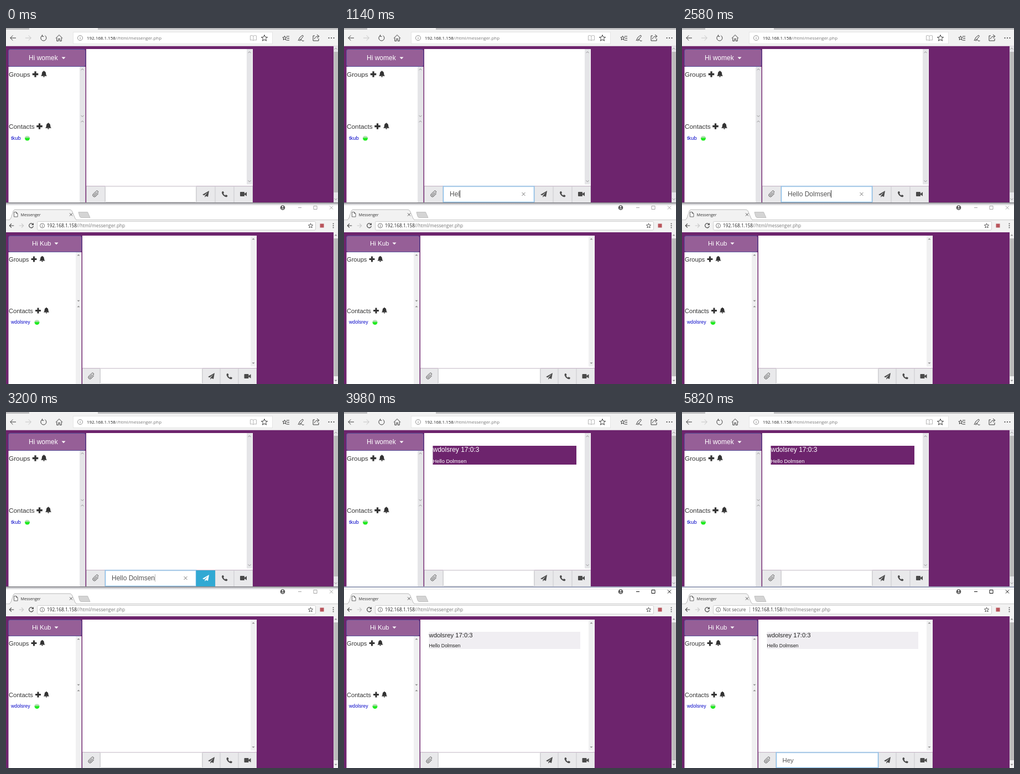
An HTML page that plays this animation: 600x643 px, repeating every 6020 ms.

```html
<!DOCTYPE html>
<html lang="en">
<head>
<meta charset="utf-8">
<title>Messenger</title>
<style>
  html, body { margin: 0; width: 100%; height: 100%; overflow: hidden; background: #fff; }
  svg { display: block; width: 600px; height: 643px; }
  text { white-space: pre; font-family: Arial, "Liberation Sans", sans-serif; }
  .ui { font-family: "Open Sans", "Noto Sans", sans-serif; }
  .line { fill: none; stroke: #3a3a3a; }
</style>
</head>
<body>
<svg id="stage" viewBox="0 0 600 643" xmlns="http://www.w3.org/2000/svg"></svg>
<script>
const LOOP = 6020, PURPLE = '#6d246d';

// Icons live in a 12 x 12 box.
const ICONS = {
  plus: 'M4.3.5h3.4v3.8h3.8v3.4H7.7v3.8H4.3V7.7H.5V4.3h3.8z',
  bell: 'M6 0a1 1 0 0 1 1 1Q9.6 1.8 9.6 5 9.6 8 11.5 9.5H.5Q2.4 8 2.4 5 2.4 1.8 5 1A1 1 0 0 1 6 0zM4.5 10h3a1.5 1.5 0 0 1-3 0z',
  plane: 'M12 0 0 7l3 1.3L10 2.4 4.4 8.9V12l1.9-2.4L10 11z',
  phone: 'M1.2 1.2 3.3.2 5 3.6 3.6 5Q5 7.6 7.2 8.6L8.6 7.2 12 9l-1 2.1Q9.5 12.5 6 10.6 2 8 .8 4.5.2 2.5 1.2 1.2z',
  video: 'M1 2h6q1 0 1 1v2.3l4-3.1v7.6L8 6.7V9q0 1-1 1H1Q0 10 0 9V3Q0 2 1 2z',
  clip: 'M10.5 5.2 6 9.7A2.7 2.7 0 0 1 2 5.9L6.9 1a1.9 1.9 0 0 1 2.7 2.7L4.9 8.3a.9.9 0 0 1-1.3-1.3L7.7 2.9',
  star: 'M6 .5 7.6 4.3 11.5 4.6 8.5 7.2 9.5 11.2 6 9 2.5 11.2 3.5 7.2.5 4.6 4.4 4.3z',
  reload: 'M8.5 1.8A5 5 0 1 1 3.8 1.5M3.5.2V3.2H6.5',
  again: 'M9.9 2.6A5 5 0 1 0 11 6.8M10.8.3V3.9H7.2',
  back: 'M12 6H.8M5.8 1 .8 6l5 5',
  cross: 'M0 0 12 12M12 0 0 12'
};

const rect = (x, y, w, h, fill, extra = '') =>
  `<rect x="${x}" y="${y}" width="${w}" height="${h}" fill="${fill}" ${extra}/>`;
const text = (x, y, size, str, fill = '#333', extra = '') =>
  `<text x="${x}" y="${y}" font-size="${size}" fill="${fill}" ${extra}>${str}</text>`;
const path = (d, extra = 'class="line"') => `<path d="${d}" ${extra}/>`;
const group = (id, content, extra = '') => `<g id="${id}" ${extra}>${content}</g>`;
const place = (cx, cy, size) => `transform="translate(${cx - size / 2} ${cy - size / 2}) scale(${size / 12})"`;
const icon = (name, cx, cy, size, fill = '#333') =>
  path(ICONS[name], `${place(cx, cy, size)} fill="${fill}"`);
const outline = (name, cx, cy, size, stroke = '#3a3a3a', width = 1) =>
  path(ICONS[name], `${place(cx, cy, size)} fill="none" stroke="${stroke}" stroke-width="${width * 12 / size}"`);
const mirrored = (cx, content) => `<g transform="translate(${2 * cx} 0) scale(-1 1)">${content}</g>`;

// dir: -1 points up, 1 points down
function arrow(x, y, dir, solid) {
  const d = `M${x - 2.5} ${y - dir * 1.2}L${x} ${y + dir * 1.3}L${x + 2.5} ${y - dir * 1.2}`;
  return path(d, solid ? 'fill="#8c8c8c"' : 'fill="none" stroke="#8a8a8a" stroke-width=".9"');
}

function scrollbar(x, y, w, h, ends, solid) {
  return rect(x, y, w, h, solid ? '#f0f0f1' : '#e5e5e8') +
    ends.map(([at, dir]) => arrow(x + w / 2, at, dir, solid)).join('');
}

function heading(o, label, y, plusX, bellX) {
  return text(5, y, o.headSize, label) + icon('plus', plusX, y - 4.5, o.size - .5) +
    icon('bell', bellX, y - 4.7, o.size);
}

function message(o) {
  const { x, y, w, h, fill, ink } = o.msg;
  return group(o.id + 'Msg', rect(x, y, w, h, fill) +
    text(x, y + (o.solid ? 9.5 : 11.3), o.size, 'wdolsrey 17:0:3', ink) +
    text(x, y + h - 3.5, o.small, 'Hello Dolmsen', ink));
}

function inputRow(o) {
  const [a, b, c, d, e, f] = o.cells, h = o.end - o.row, cy = o.row + 14.5;
  const cell = (x, w) => rect(x + .5, o.row + .5, w - 1, h, '#e9e9eb', 'stroke="#d9d9dc"');
  const field = (stroke, extra) => rect(b + .5, o.row + .5, c - b - 1, h - 1, 'none', `stroke="${stroke}" ${extra}`);
  return cell(a, b - a) + cell(c, d - c) + cell(d, e - d) + cell(e, f - e) +
    rect(b, o.row, c - b, h, '#fff') + field('#d2d2d4', 'rx="1"') +
    group(o.id + 'Glow', field('#66afe9', 'stroke-width="3" opacity=".16"') + field('#85bfec', 'stroke-width="1"')) +
    outline('clip', (a + b) / 2, cy, 13, '#505050', 1) +
    icon('plane', (c + d) / 2, cy, 12, '#4a4a4a') + icon('phone', (d + e) / 2, cy, 11, '#4a4a4a') +
    icon('video', (e + f) / 2, cy, 12, '#4a4a4a') +
    text(o.textX, o.row + 18.2, o.size, '', '#555', `id="${o.id}Text"`) +
    rect(0, o.row + 7.5, 1, 13.5, '#333', `id="${o.id}Caret"`);
}

function page(o) {
  const { side, top, list, mid, end, cells, row, solid } = o;
  const left = cells[0], right = cells[5], bar = o.barX, barW = side - bar - 1;
  return rect(0, o.pageY, 600, end - o.pageY, PURPLE) +
    rect(4.5, top + .5, side - 5, list - top - 1, '#965f97', 'rx="3" stroke="#56529a"') +
    text(o.hiX, o.hiY, o.hiSize, o.hi, '#fff') +
    path(`M${o.dropX} ${o.hiY - 5.5}h7l-3.5 3.7z`, 'fill="#fff"') +
    rect(4.5, list, side - 5, end - list, '#fff') +
    scrollbar(bar, list, barW, mid - list, [[list + 5, -1], [mid - 5, 1]], solid) +
    scrollbar(bar, mid, barW, end - mid, [[mid + 5, -1]], solid) +
    heading(o, 'Groups', o.groupY, ...o.groupIcons) +
    heading(o, 'Contacts', o.contactY, ...o.contactIcons) +
    text(9, o.nameY, o.small, o.contact, '#0505c8') +
    `<circle cx="${o.dotX}" cy="${o.nameY - 2.5}" r="4.5" fill="url(#dot)"/>` +
    rect(left, top, right - left, row - top, '#fff') +
    scrollbar(right - 11, top, 10, row - top - 3, [[top + 6, -1], [row - 9, 1]], solid) +
    message(o) + inputRow(o) +
    scrollbar(592, o.pageY, 8, end - o.pageY, [[o.pageY + 5, -1], [end - 6, 1]], solid) +
    rect(592.5, o.thumb[0], 7.5, o.thumb[1], '#bbb');
}

const upper = {
  id: 'up', pageY: 32.5, top: 38, list: 70, mid: 164, row: 285.5, end: 315, side: 144, barX: 133,
  size: 12, headSize: 11.8, small: 9.4, hi: 'Hi womek', hiX: 41, hiY: 58, hiSize: 12, dropX: 100.5,
  groupY: 88, groupIcons: [53, 68.5], contactY: 182, contactIcons: [60.5, 76.5],
  contact: 'tkub', nameY: 201.5, dotX: 38.5, cells: [145, 179, 344, 378, 412, 446], textX: 191,
  thumb: [43, 254], msg: { x: 160.5, y: 61, w: 259.5, h: 34, fill: PURPLE, ink: '#fff' }
};
const lower = {
  id: 'low', pageY: 369, top: 375, list: 405, mid: 498, row: 614.5, end: 643, side: 137, barX: 126,
  size: 11.3, headSize: 11.1, small: 8.75, hi: 'Hi Kub', hiX: 47, hiY: 393, hiSize: 11.5, dropX: 87.5,
  groupY: 422, groupIcons: [50.5, 65.5], contactY: 515, contactIcons: [58, 73],
  contact: 'wdolsrey', nameY: 534, dotX: 56, cells: [138, 170, 355, 387, 420, 453], textX: 181.5,
  thumb: [380, 249], solid: true, msg: { x: 153.5, y: 397, w: 273.5, h: 31, fill: '#f0eef2', ink: '#222' }
};

const info = (x, y, r, color) =>
  `<circle cx="${x}" cy="${y}" r="${r}" class="line" style="stroke:${color};stroke-width:.8"/>` +
  path(`M${x} ${y - 2.2}v1M${x} ${y - .4}v2.7`, `stroke="${color}" stroke-width=".9"`);

const address = (x, y, size) => text(x, y, size,
  '192.168.1.158<tspan fill="#777">//html/messenger.php</tspan>', '#222', 'class="ui"');

function upperBar() {
  return rect(0, 0, 600, 32.5, '#f2f2f2') + rect(0, 0, 42, 3, '#bcbcbe') + rect(166, 0, 434, 3, '#bcbcbe') +
    rect(121.5, 7.5, 360, 21, '#fff', 'stroke="#e6e6e6"') +
    outline('back', 12.5, 18, 11) + mirrored(40.5, outline('back', 40.5, 18, 11, '#c4c4c4')) +
    outline('reload', 68, 18, 12) +
    path('M90 18.5 96 12.5l6 6M91.8 17.5V23.500h3v-4h2.400v4h3v-6') +
    info(134, 18, 4.5, '#777') + address(146, 21, 7.95) +
    path('M447 14.5v8M447 14.5q-3-2-5.500-.5v8q3-1 5.500.5 2.500-1.500 5.500-.5v-8q-3-1.500-5.500.5',
      'fill="none" stroke="#b5b5b5"') +
    outline('star', 467, 18, 12) +
    outline('star', 503.5, 18, 8) + path('M507 15h5M508 18.5h4M506.5 22h5.500') +
    path('M528 23q2-7 8-10l1.500 1.500q-3 5.500-8 8M531 23.500q3-4 3.500-1.500t4 1') +
    path('M558 14h-3v9h10v-4M557.500 20q1-5 7-5M562 12l4 3-4 3.500') +
    [583.5, 588, 592.5].map(x => `<circle cx="${x}" cy="18" r="1" fill="#333"/>`).join('');
}

function lowerBar() {
  return rect(0, 315, 600, 54, '#fff') + rect(0, 315, 600, 6, 'url(#shade)') +
    group('edge', rect(0, 315, 600, 4, '#fff') + rect(0, 315.5, 600, 1.2, '#59658c')) +
    rect(0, 346, 600, 23, '#f2f2f2') + path('M0 346.500H600', 'stroke="#c8c8c8"') +
    path('M5 347Q8 346 9.500 342L13 331Q14 328 17 328H115Q118 328 119.500 331L124 342Q125.500 346 128 347',
      'fill="#f2f2f2" stroke="#b8b8b8"') +
    path('M131 332.500H147.500L152 342.500H136Q134 342.500 133 340z', 'fill="#d4d4d4" stroke="#b5b5b5" stroke-width=".8"') +
    path('M14.500 332.500h4l2.500 2.500v6h-6.500zM18.500 332.500v2.500h2.500', 'fill="#fff" stroke="#555" stroke-width=".9"') +
    text(26.5, 339.5, 7.1, 'Messenger', '#333', 'class="ui"') +
    outline('cross', 117.5, 337, 5, '#555') +
    `<circle cx="500" cy="324.5" r="4.3" fill="#555"/><circle cx="500" cy="323" r="1.4" fill="#fff"/>` +
    path('M497.300 327q2.700-2.600 5.400 0z', 'fill="#fff"') +
    group('controls', path('M528 324.500h6M556 321.500h6v6h-6zM585 321.500l6 6M591 321.500l-6 6', ''), 'fill="none"') +
    outline('back', 10, 357, 8.5, '#444', 1.1) + mirrored(28, outline('back', 28, 357, 8.5, '#c8c8c8', 1.1)) +
    outline('again', 45.5, 357, 9.5, '#444', 1.2) +
    rect(56.5, 349.5, 503, 15.5, '#fff', 'rx="2" stroke="#cfcfcf"') +
    info(65.5, 357, 4, '#555') +
    group('secure', text(74, 360, 8.2, 'Not secure', '#555', 'class="ui"') + path('M122.500 352v10', 'stroke="#bbb"')) +
    group('url', address(74, 360, 8.3)) +
    outline('star', 550.5, 357, 9, '#555') + rect(567.5, 353.5, 7, 7, '#b9555c') +
    [353.5, 357, 360.5].map(y => `<circle cx="591.5" cy="${y}" r="1" fill="#555"/>`).join('');
}

const stage = document.getElementById('stage');
stage.innerHTML = `<defs>
  <linearGradient id="dot" x2="0" y2="1"><stop stop-color="#dfeadf"/><stop offset=".4" stop-color="#8fdc8f"/><stop offset=".55" stop-color="#1eea1e"/><stop offset="1" stop-color="#1ef01e"/></linearGradient>
  <linearGradient id="shade" x2="0" y2="1"><stop stop-color="#77777c"/><stop offset=".4" stop-color="#c4c4c8"/><stop offset="1" stop-color="#fff"/></linearGradient>
</defs>` + page(upper) +
  group('clear', outline('cross', 324.5, 300, 6, '#666', .9)) +
  group('hot', rect(343.5, 286, 34.5, 29, '#31a9d3') + icon('plane', 361, 300, 12, '#fff')) +
  upperBar() + lowerBar() + page(lower);

const el = {};
for (const node of stage.querySelectorAll('[id]')) el[node.id] = node;

const ramp = (t, a, b) => Math.min(1, Math.max(0, (t - a) / (b - a)));
const show = (id, opacity) => el[id].setAttribute('opacity', +opacity);
const between = (t, a, b) => t >= a && t < b;

const GREETING = 'Hello Dolmsen';
const KEYS = [720, 900, 960, 1160, 1240, ...Array.from({ length: 8 }, (_, i) => 1400 + i * 85)];
const REPLY_KEYS = [4900, 5000, 5100, 5190];
const typed = (str, keys, t) => str.slice(0, keys.filter(k => t >= k).length);

function write(o, str, caret) {
  const label = el[o.id + 'Text'];
  if (label.textContent !== str) label.textContent = str;
  const width = str ? label.getComputedTextLength() : 0;
  el[o.id + 'Caret'].setAttribute('x', Math.round(o.textX + width - .5));
  show(o.id + 'Caret', caret);
}

function draw(t) {
  const sent = t >= 3260;
  let draft = sent ? '' : typed(GREETING, KEYS, t);
  if (between(t, 2040, 2300)) draft += 'n';
  const blink = 1 - ramp(t, 2580, 2660) + ramp(t, 2800, 2880) * .35;
  write(upper, draft, between(t, 380, 3240) ? blink : 0);
  show('upGlow', ramp(t, 360, 440) - ramp(t, 3220, 3300));
  show('clear', draft !== '');
  show('hot', ramp(t, 2860, 2940) - ramp(t, 3400, 3480));
  show('upMsg', t >= 3300);
  show('lowMsg', t >= 3420);

  const active = t >= 3960;
  show('edge', active);
  el.controls.setAttribute('stroke', active ? '#111' : '#a5a5a5');
  show('lowGlow', ramp(t, 4020, 4100));
  const caret = between(t, 4020, 4140) || between(t, 4340, 4540) ||
    between(t, 4760, 5400) || between(t, 5600, 5820);
  write(lower, typed('Hey ', REPLY_KEYS, t), caret);

  const warn = ramp(t, 4920, 5060);
  el.url.setAttribute('transform', `translate(${53 * warn} 0)`);
  show('secure', ramp(t, 4960, 5080));
}

let start;
function tick(now) {
  start ??= now;
  draw((now - start) % LOOP);
  requestAnimationFrame(tick);
}
draw(0);
requestAnimationFrame(tick);
</script>
</body>
</html>
```
